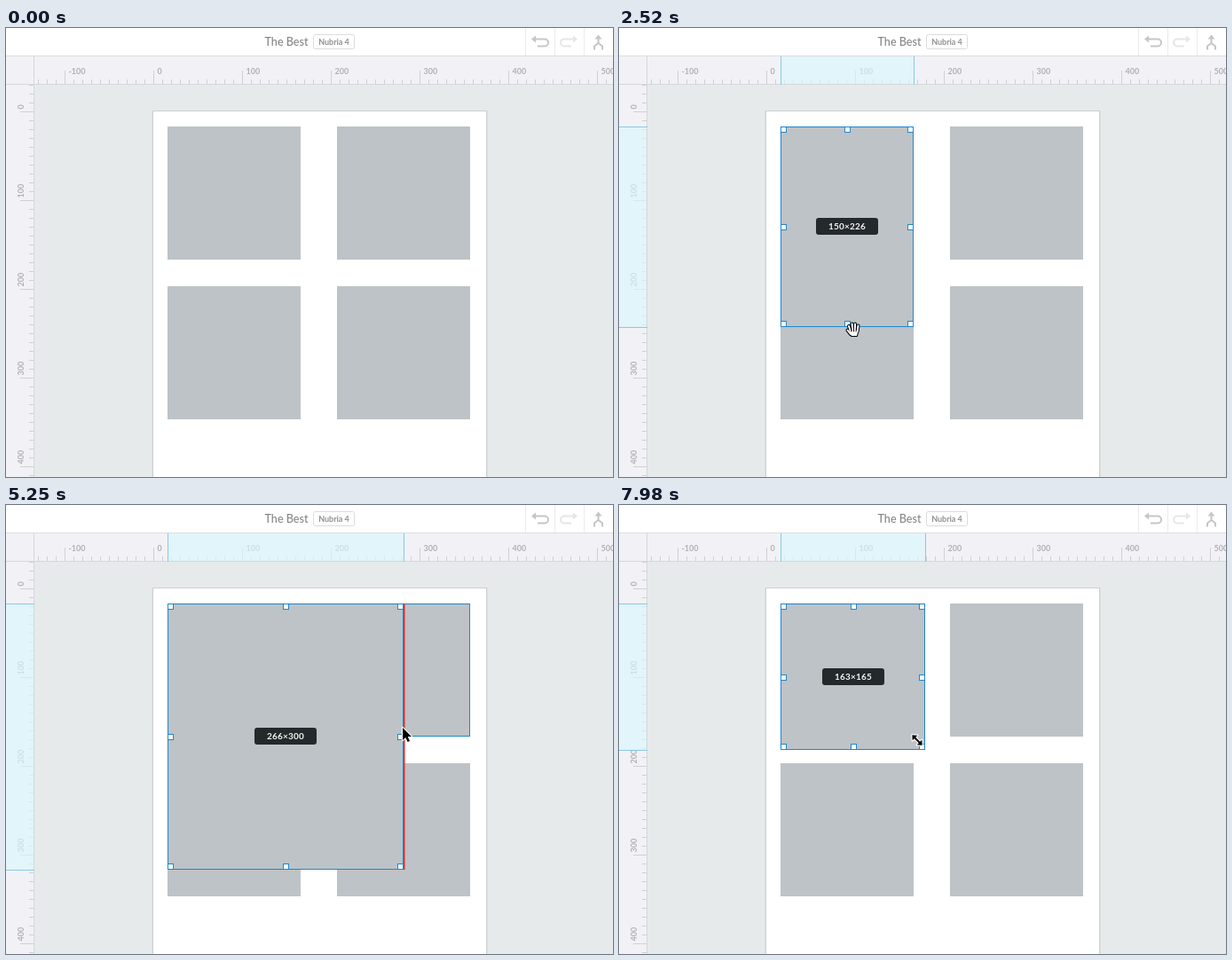
Write an HTML page with a canvas that moves like this. It is 684x506 px and loops after 8 s.

```html
<!DOCTYPE html>
<html lang="en">
<head>
<meta charset="utf-8">
<title>Resize demo</title>
<style>
  html, body { margin: 0; width: 100%; height: 100%; overflow: hidden; background: #e6eaeb; }
  canvas { display: block; width: 684px; height: 506px; }
</style>
</head>
<body>
<canvas id="stage"></canvas>
<script>
const W = 684, H = 506, LOOP = 8000, STEP = 70, MAGNET = 4;
const FONT = 'Lato, "Open Sans", sans-serif';
const BLUE = '#1f86cc', RED = '#c8383a', TILE = '#bdc3c7';
const ORIGIN = { x: 166, y: 94 }, BOX = { x: 182, y: 111 };
const TILES = { topRight: [373, 111], lowLeft: [182, 291], lowRight: [373, 291] };

// edges that attract the dragged side
const SNAP_X = [[332, 'lowLeft'], [373, 'topRight'], [448, 'topRight']];
const SNAP_Y = [[291, 'lowRight'], [366, 'lowLeft']];

// from, to, resizes width, resizes height
const DRAGS = [[1960, 3780, 0, 1], [4690, 5740, 1, 0], [6790, LOOP, 1, 1]];

// time, width, height; the last drag runs on past the loop
const SIZE = [
  [1960, 150, 150], [2520, 150, 226], [3430, 150, 289], [3710, 150, 300],
  [4900, 150, 300], [5250, 266, 300], [5320, 266, 300], [5460, 272, 300],
  [7070, 272, 300], [8900, 126, 119]
];
// time, x, y
const PATH = [
  [140, -6, 209], [560, 240, 184], [980, 240, 184], [1540, 258, 265], [1820, 258, 258],
  [1890, 258, 258], [2520, 264, 340], [3430, 264, 397], [3710, 264, 407],
  [3850, 264, 407], [4480, 330, 261], [4620, 330, 261], [4830, 349, 254],
  [4900, 349, 254], [5250, 447, 251], [5460, 453, 252], [5600, 453, 252],
  [6160, 452, 442], [6510, 449, 405], [7070, 449, 405], [8900, 298, 218]
];
const CURSOR = [
  [0, ''], [70, 'arrow'], [1470, 'ns'], [1960, 'hand'], [3780, 'ns'], [3920, 'arrow'],
  [4410, 'ew'], [4690, 'arrow'], [6370, 'nwse']
];

const canvas = document.getElementById('stage');
const dpr = window.devicePixelRatio || 1;
canvas.width = W * dpr;
canvas.height = H * dpr;
const c = canvas.getContext('2d');

const easeOut = p => 1 - (1 - p) ** 2;

function tween(keys, t) {
  const i = keys.findIndex(k => k[0] > t);
  if (i === 0) return keys[0].slice(1);
  const a = keys[i - 1], b = keys[i];
  const p = easeOut((t - a[0]) / (b[0] - a[0]));
  return [1, 2].map(n => Math.round(a[n] + (b[n] - a[n]) * p));
}

const held = (keys, t) => keys.filter(k => k[0] <= t).pop()[1];

function fill(color, x, y, w, h) {
  c.fillStyle = color;
  c.fillRect(x, y, w, h);
}

function frame(x, y, w, h) {
  c.strokeStyle = BLUE;
  c.lineWidth = 1;
  c.strokeRect(x + .5, y + .5, w - 1, h - 1);
}

function text(s, x, y, font, color, align = 'left') {
  c.font = font + ' ' + FONT;
  c.fillStyle = color;
  c.textAlign = align;
  c.fillText(s, x, y);
}

function trace(pts, close) {
  c.beginPath();
  pts.forEach(([x, y]) => c.lineTo(x, y));
  if (close) c.closePath();
}

function turnArrow(x, dir, color) {
  c.save();
  c.translate(x, 0);
  c.scale(dir, 1);
  c.strokeStyle = c.fillStyle = color;
  c.lineWidth = 2;
  c.beginPath();
  c.moveTo(-8, 12.5);
  c.arc(5, 16.5, 4, -Math.PI / 2, Math.PI / 2);
  c.lineTo(-3, 20.5);
  c.stroke();
  trace([[-10, 12.5], [-5, 8.5], [-5, 16.5]], true);
  c.fill();
  c.restore();
}

function mergeIcon(x, color) {
  c.strokeStyle = c.fillStyle = color;
  c.lineWidth = 2;
  c.beginPath();
  c.moveTo(x, 11);
  c.lineTo(x, 17);
  for (const side of [-4.5, 4.5]) {
    c.moveTo(x, 17);
    c.lineTo(x + side, 20.5);
    c.lineTo(x + side, 24.5);
  }
  c.stroke();
  trace([[x, 7.5], [x + 4, 12.5], [x - 4, 12.5]], true);
  c.fill();
}

function header() {
  fill('#fff', 0, 0, W, 31);
  fill('#dcdde0', 0, 31, W, 1);
  text('The Best', 291.5, 20, '500 12.6px', '#858585');
  c.strokeStyle = '#dcdcdc';
  c.lineWidth = 1;
  c.beginPath();
  c.roundRect(346.5, 7.5, 46, 16, 2);
  c.stroke();
  text('Nubria 4', 369.5, 19, '700 9px', '#909090', 'center');
  for (const x of [585, 618, 651]) fill('#ebebee', x, 0, 1, 31);
  turnArrow(602, 1, '#c6c6c9');
  turnArrow(634, -1, '#e6e6e8');
  mergeIcon(667.5, '#c6c6c9');
}

function rulers(sel) {
  const mark = '#cfd0d5', ink = '#b0b1b5', font = '700 9px';
  fill('#f2f2f6', 0, 32, W, 32);
  fill('#f2f2f6', 0, 64, 32, H - 64);
  for (let u = -130; u <= 520; u += 10) {
    const x = ORIGIN.x + u, y = ORIGIN.y + u, long = u % 100 === 0, len = long ? 15 : 5;
    fill(mark, x, 63 - len, 1, len);
    if (long) text(u, x + 4.5, 52, font, ink);
    if (y < 64) continue;
    fill(mark, 31 - len, y, len, 1);
    if (!long) continue;
    c.save();
    c.translate(20, y - 2.5);
    c.rotate(-Math.PI / 2);
    text(u, 0, 0, font, ink);
    c.restore();
  }
  fill('#d5d7db', 0, 63, W, 1);
  fill('#d5d7db', 31, 32, 1, H - 32);
  if (!sel) return;
  const [w, h] = sel, tint = 'rgba(217,246,253,.68)', edge = '#8ac8e5';
  fill(tint, BOX.x, 32, w, 31);
  fill(tint, 0, BOX.y, 31, h);
  for (const x of [BOX.x, BOX.x + w]) fill(edge, x, 32, 1, 32);
  for (const y of [BOX.y, BOX.y + h]) fill(edge, 0, y, 32, 1);
}

function artboard() {
  fill('#e6eaeb', 0, 64, W, H - 64);
  fill('#dde1e2', 164, 93, 379, H);
  fill('#cdd1d2', 165, 93, 377, H);
  fill('#fff', 166, 94, 375, H);
  for (const [x, y] of Object.values(TILES)) fill(TILE, x, y, 150, 150);
}

function snap(list, active, edge) {
  return active ? list.find(s => Math.abs(s[0] - edge) < MAGNET) : undefined;
}

function guideLines(sx, sy, right, bottom) {
  if (sx) fill(RED, sx[0], BOX.y, 1.5, Math.max(bottom, TILES[sx[1]][1] + 150) - BOX.y);
  if (sy) fill(RED, BOX.x, sy[0], Math.max(right, TILES[sy[1]][0] + 150) - BOX.x, 1.5);
}

function handles(w, h) {
  const spots = (start, size) => [start, Math.round(start + size / 2) - 3, start + size - 7];
  const xs = spots(BOX.x, w), ys = spots(BOX.y, h);
  xs.forEach((x, i) => ys.forEach((y, j) => {
    if (i === 1 && j === 1) return;
    fill('#fff', x, y, 7, 7);
    frame(x, y, 7, 7);
  }));
}

function badge(w, h) {
  const x = Math.round(BOX.x + w / 2), y = Math.round(BOX.y + h / 2);
  c.fillStyle = '#24292b';
  c.beginPath();
  c.roundRect(x - 35, y - 10, 70, 19, 3);
  c.fill();
  c.letterSpacing = '.2px';
  text(w + '×' + h, x, y + 3, '700 10px', '#f4f4f4', 'center');
  c.letterSpacing = '0px';
}

function hand() {
  const fingers = [
    [-3, 2, -5, -4], [-.5, 1, -1.5, -6.5], [2, 1, 2, -6.5], [4.5, 2, 5.5, -4.5], [-3, 5, -6.5, .5]
  ];
  const palm = [[-4.5, 2], [5.5, 1], [4, 7], [-2, 7]];
  c.lineCap = c.lineJoin = 'round';
  for (const [color, width] of [['#000', 4], ['#fff', 2]]) {
    c.strokeStyle = c.fillStyle = color;
    c.lineWidth = width;
    for (const [x, y, u, v] of fingers) {
      trace([[x, y], [u, v]]);
      c.stroke();
    }
    trace(palm, true);
    c.fill();
    c.lineWidth = 2;
    if (color === '#000') c.stroke();
  }
  c.strokeStyle = '#000';
  c.lineWidth = .8;
  for (const x of [-2.4, .5, 3.4]) {
    trace([[x, -3], [x * .9, 2]]);
    c.stroke();
  }
}

const ARROW = [[0, 0], [0, 14], [3.3, 11], [5.6, 16], [8, 15], [5.7, 10], [10, 10]];
const HALF = [[0, -8], [4, -3.5], [1, -3.5], [1, 3.5], [4, 3.5]];
const DOUBLE = HALF.concat(HALF.map(([x, y]) => [-x, -y]));
const TURN = { arrow: 0, ns: 0, ew: Math.PI / 2, nwse: -Math.PI / 4 };

function cursor(kind, [x, y]) {
  if (!kind) return;
  c.save();
  c.translate(x, y);
  if (kind === 'hand') {
    hand();
  } else {
    c.rotate(TURN[kind]);
    trace(kind === 'arrow' ? ARROW : DOUBLE, true);
    c.lineJoin = 'round';
    c.strokeStyle = '#fff';
    c.lineWidth = 2.2;
    c.stroke();
    c.fillStyle = '#000';
    c.fill();
  }
  c.restore();
}

function draw(t) {
  const hover = t >= 490, selected = t >= 700;
  const drag = DRAGS.find(d => t >= d[0] && t < d[1]);
  let [w, h] = tween(SIZE, t);
  const sx = snap(SNAP_X, drag && drag[2], BOX.x + w);
  const sy = snap(SNAP_Y, drag && drag[3], BOX.y + h);
  if (sx) w = sx[0] - BOX.x;
  if (sy) h = sy[0] - BOX.y;

  c.setTransform(dpr, 0, 0, dpr, 0, 0);
  artboard();
  for (const s of [sx, sy]) if (s) frame(...TILES[s[1]], 150, 150);
  fill(TILE, BOX.x, BOX.y, w, h);
  if (hover) frame(BOX.x, BOX.y, w, h);
  guideLines(sx, sy, BOX.x + w, BOX.y + h);
  if (selected) handles(w, h);
  if (drag) badge(w, h);
  rulers(selected && [w, h]);
  header();
  cursor(held(CURSOR, t), tween(PATH, t));
}

const start = performance.now();
function tick() {
  const t = (performance.now() - start) % LOOP;
  draw(Math.floor(t / STEP) * STEP);
  requestAnimationFrame(tick);
}
tick();
</script>
</body>
</html>
```
